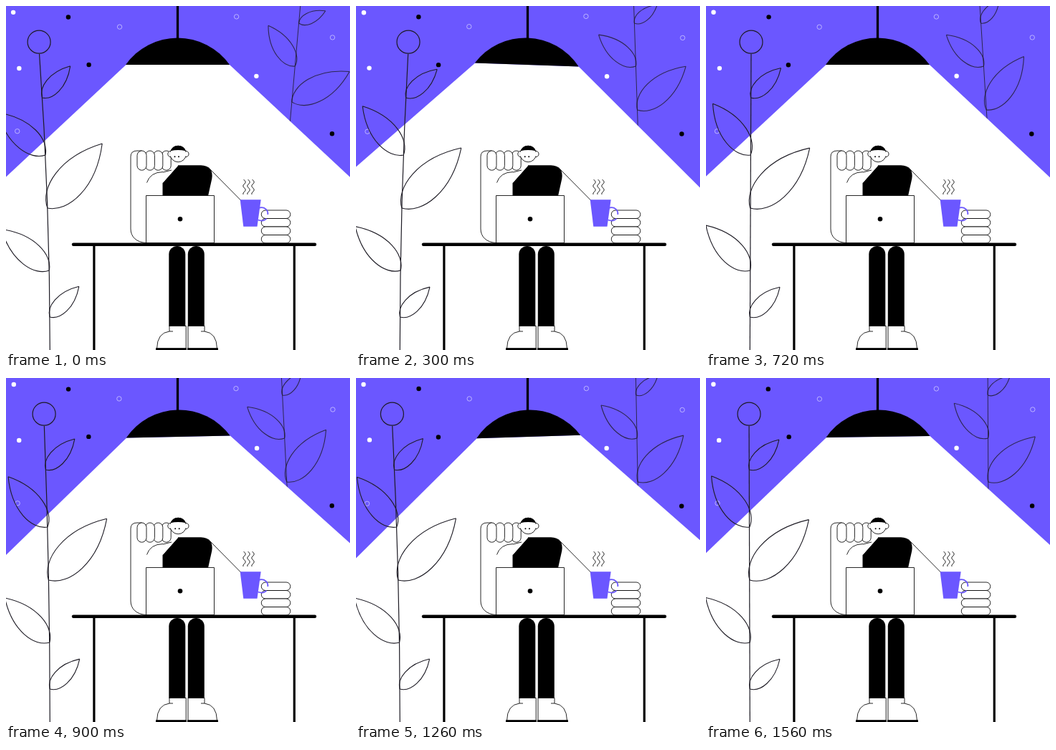
These frames come from a looping animation (480x480 px, 1.62 s). An HTML page with a canvas:

```html
<!DOCTYPE html>
<html lang="en">
<head>
<meta charset="utf-8">
<title>Desk under a lamp</title>
<style>
  html, body { margin: 0; width: 100%; height: 100%; overflow: hidden; background: #fff; }
  canvas { display: block; width: 480px; height: 480px; }
</style>
</head>
<body>
<canvas id="stage"></canvas>
<script>
const LOOP = 1620, STEP = 60;
const PURPLE = '#6b57ff', BLACK = '#000', WHITE = '#fff', INK = '#1d1b24';
const RAD = Math.PI / 180;

const canvas = document.getElementById('stage');
const ctx = canvas.getContext('2d');
const dpr = window.devicePixelRatio || 1;
canvas.width = canvas.height = 480 * dpr;

// Sine ease in and out between [time, value] turning points.
function swing(t, ...points) {
  const i = points.findIndex(p => p[0] > t);
  if (i < 0) return points[points.length - 1][1];
  const [t0, a] = points[i - 1], [t1, b] = points[i];
  return a + (b - a) * (1 - Math.cos(Math.PI * (t - t0) / (t1 - t0))) / 2;
}

function paint(d, fill, stroke, width = 0.85) {
  const p = typeof d === 'string' ? new Path2D(d) : d;
  if (fill) { ctx.fillStyle = fill; ctx.fill(p); }
  if (stroke) { ctx.strokeStyle = stroke; ctx.lineWidth = width; ctx.stroke(p); }
}

function disc(x, y, r, fill, stroke, width) {
  const p = new Path2D();
  p.arc(x, y, r, 0, 7);
  paint(p, fill, stroke, width);
}

function pill(x, y, w, h, r, fill, stroke) {
  const p = new Path2D();
  p.roundRect(x, y, w, h, r);
  paint(p, fill, stroke);
}

// Leaf growing from (x, y); the angle runs clockwise from straight up.
function leaf(x, y, size, angle) {
  const dx = size * Math.sin(angle), dy = -size * Math.cos(angle);
  const at = (a, s) => [x + dx * a + dy * s, y + dy * a - dx * s];
  const p = new Path2D();
  for (const side of [-1, 1]) {
    p.moveTo(x, y);
    p.bezierCurveTo(...at(0.12, side * 0.22), ...at(0.55, side * 0.29), ...at(1, 0));
  }
  paint(p, null, INK, 1.1);
}

function drawDots(t) {
  const a = t / LOOP * Math.PI * 2;
  const groups = [
    [WHITE, [10.5, 9], [18.5, 86.7], [349.7, 98]],
    [BLACK, [87.2, 15.3], [115.3, 82.2], [454.7, 178.5]],
    [null, [158.2, 29], [321.3, 14.7], [455.6, 44.2], [15.8, 175]]
  ];
  for (const [fill, ...spots] of groups) {
    for (const [x, y] of spots) {
      const wx = 0.4 * Math.sin(a * 3 + x), wy = 0.3 * Math.cos(a * 2 + x);
      disc(x + wx, y + wy, 3.2, fill, fill ? null : '#d0caff', 0.8);
    }
  }
}

function rightPlant(t) {
  const top = swing(t, [-240, 420], [500, 381], [LOOP, 393.3]);
  const foot = 394 + (top - 394) * 0.15;
  const rootY = swing(t, [-100, 132], [300, 145]);
  const rightTurn = swing(t, [-150, 64.5], [690, 35], [1440, 46]);
  const leftTurn = swing(t, [-120, -30], [330, -50], [960, -50], [LOOP, -44]);
  const stemX = y => foot + (top - foot) * (1 - y / 160);
  ctx.globalAlpha = 0.8;
  paint(`M${foot} 175V160L${top} 0`, null, INK, 1);
  leaf(stemX(rootY), rootY, 91, rightTurn * RAD);
  leaf(stemX(84), 84, 68, leftTurn * RAD);
  leaf(stemX(24), 24, 41, (rightTurn + 3) * RAD);
  ctx.globalAlpha = 1;
}

function leftPlant(t) {
  const sway = swing(t, [-100, -18], [380, 13.5], [1110, -13], [LOOP, -0.8]);
  const flap = swing(t, [0, -9], [700, 0]);
  const x0 = 61.3, y0 = 480, tall = 413;
  paint(`M${x0} ${y0}Q${x0} ${y0 - tall / 2} ${x0 + sway} ${y0 - tall}`, null, INK, 1.2);
  disc(x0 + sway * 1.03, 50.2, 16, null, INK, 1.2);

  // Each leaf follows the tilt of the stem where it grows.
  const grow = (y, size, turn, lag) => {
    const u = (y0 - y) / tall;
    const tilt = 2 * u * sway / tall + (turn + flap * lag) * RAD;
    leaf(x0 + sway * u * u, y, size, tilt);
  };
  grow(128, 59, 45, 0);
  grow(208, 89, -36.5, 1);
  grow(282, 118, 44.5, 0.25);
  grow(369, 88, -44.5, 0.4);
  grow(434, 59, 45, 0.1);
}

function lamp(t) {
  const angle = swing(t, [-315, -1.95], [315, 1.95], [1140, -1.9], [LOOP, -0.75]);
  ctx.save();
  ctx.translate(240, 44);
  ctx.rotate(angle * RAD);
  ctx.translate(-240, -44);
  paint('M167.5 82L-333 549.5V1000H813V549.5L312 82Z', WHITE);
  paint('M167 82A88.8 88.8 0 0 1 312 82Z', BLACK);
  ctx.restore();
  paint('M239.5 0V47', null, BLACK, 3.3);
}

function steam() {
  for (let x = 332.5; x < 346; x += 6) {
    const p = new Path2D();
    for (let y = 242; y <= 263; y++) p.lineTo(x + 1.7 * Math.sin((y - 243) * 0.58), y);
    paint(p, null, BLACK);
  }
}

function legs() {
  pill(227.3, 335, 23, 112, [11.5, 11.5, 0, 0], BLACK);
  pill(253.8, 335, 23, 112, [11.5, 11.5, 0, 0], BLACK);
  paint('M228 446.5V454Q211 456 210.5 478H251.2V446.5Z', WHITE, BLACK);
  paint('M277 446.5V454Q294 456 294.5 478H254V446.5Z', WHITE, BLACK);
  paint('M228 454H233M277 454H272', null, BLACK);
  paint('M209 478.6H252M253 478.6H296', null, BLACK, 2.6);
}

function raisedArm() {
  const edge = 'M196 330.5C182 330 174 322 174 311V210Q174 202 183 202H190';
  paint(edge + 'H224V229L219 231Q201 232 196.5 246Z', WHITE);
  paint(edge + 'M196.5 246.5Q201 232 219 231.5', null, BLACK);
}

function body() {
  paint('M218.5 265V247L240 222.3H272Q290 223 287.3 241L282 265Z', BLACK);
  paint('M218.5 247V234L230 229L238 218L240 223Z', WHITE);
  paint('M219 232L231 229M284 227L328 271.5', null, BLACK);
  for (let i = 3; i >= 0; i--) pill(183 + i * 11.4, 202, 13, 27.2, 6.5, WHITE, BLACK);
}

function head(t) {
  const look = t / LOOP * 1.2;
  for (const x of [230, 250.8]) disc(x, 206.5, 4.2, WHITE, BLACK);
  disc(240.2, 206.5, 11.2, WHITE, BLACK);
  ctx.fillStyle = WHITE;
  ctx.fillRect(228.5, 203.8, 23.5, 5.6);
  paint('M229.5 202.3Q232 195 240.2 194.8Q248.5 195 251 202.3Q240 199.8 229.5 202.3Z', BLACK);
  for (const x of [235.5, 241]) disc(x + look, 210.2, 1, BLACK);
}

function laptop() {
  paint('M195.5 264.5H290.5V330.5H195.5Z', WHITE, BLACK);
  disc(243, 297.2, 3.3, BLACK);
}

function cup() {
  for (let i = 0; i < 4; i++) pill(356.3, 285 + i * 11.5, 40.5, 11.5, 5.7, WHITE, BLACK);
  paint('M354 281.5C361 280 366 285 365.3 291M351.5 298.5C357 300.5 361 299.5 363.5 296.5', null, PURPLE, 1.8);
  paint('M326.7 270.3H355.7L350.5 307.8H331.3Z', PURPLE);
}

function desk() {
  paint('M122.9 333V480M402.3 333V480', null, BLACK, 3.2);
  ctx.lineCap = 'round';
  paint('M94 332.7H431', null, BLACK, 4.4);
  ctx.lineCap = 'butt';
}

function draw(t) {
  ctx.setTransform(dpr, 0, 0, dpr, 0, 0);
  ctx.fillStyle = PURPLE;
  ctx.fillRect(0, 0, 480, 480);
  for (const part of [drawDots, rightPlant, lamp, legs, raisedArm, body,
                      head, laptop, steam, cup, desk, leftPlant]) part(t);
}

const start = performance.now();
function tick() {
  const t = (performance.now() - start) % LOOP;
  draw(Math.floor(t / STEP) * STEP);
  requestAnimationFrame(tick);
}
tick();
</script>
</body>
</html>
```
